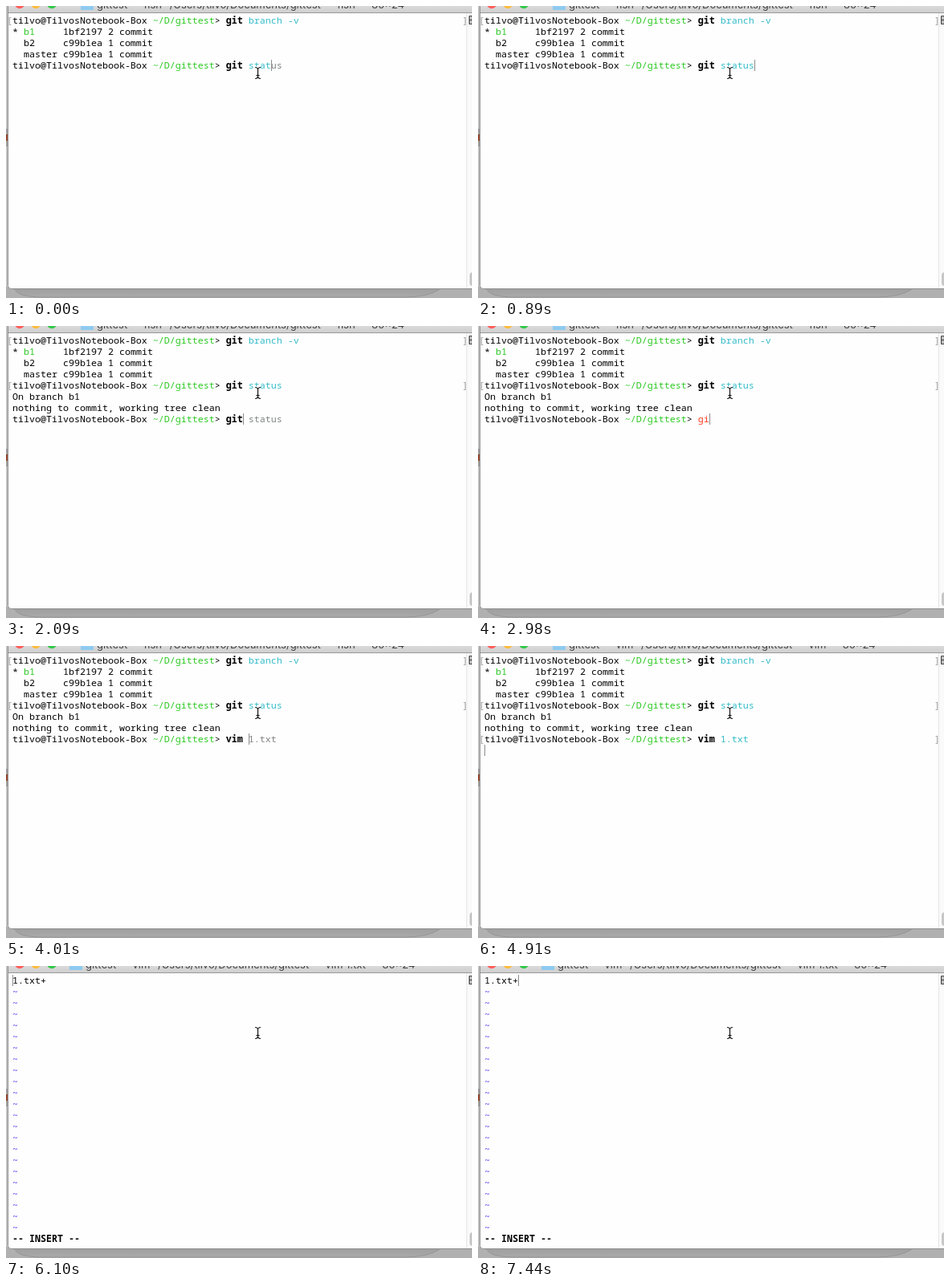
These frames come from a looping animation (580 by 364 pixels, 8000 ms). An HTML page:

```html
<!DOCTYPE html>
<html lang="en">
<head>
<meta charset="utf-8">
<title>Terminal session</title>
<style>
  html, body { margin: 0; width: 100%; height: 100%; overflow: hidden; background: #b0b0b0; }
  svg { display: block; width: 580px; height: 364px; }
  text { white-space: pre; }
  #screen { font: 500 11.667px "Noto Sans Mono", "DejaVu Sans Mono", monospace; fill: #000; }
  #title { font: 13px Inter, sans-serif; fill: #444; }
  .bold { font-weight: bold; }
  .green { fill: #2bc922; }
  .cyan { fill: #33bbc8; }
  .gray { fill: #818383; }
  .red { fill: #fc391f; }
  .blue { fill: #5833ff; }
  .mark { fill: #999; }
</style>
</head>
<body>
<svg viewBox="0 0 580 364">
  <defs>
    <linearGradient id="bar" x2="0" y2="1">
      <stop stop-color="#d9d9d9"/><stop offset="1" stop-color="#d0d0d0"/>
    </linearGradient>
    <linearGradient id="shade" x2="0" y2="1">
      <stop stop-color="#999"/><stop offset="1" stop-color="#a9a9a9"/>
    </linearGradient>
    <path id="beam" d="M310 76.5q3.5 0 3.5 3v8q0 3-3.5 3M317 76.5q-3.5 0-3.5 3M317 90.5q-3.5 0-3.5-3M311.5 86.5h4"/>
  </defs>

  <!-- desktop behind the window -->
  <rect width="4" height="350" fill="#c2c2c2"/>
  <rect y="153" width="3" height="22" fill="#a0a0a0"/>
  <rect y="160" width="3" height="8" fill="#9a4a30"/>
  <path d="M10 346V352Q14 362 40 363H500Q538 361 546 346z" fill="url(#shade)" stroke="#959595"/>

  <!-- window -->
  <path d="M2.5 0V348.500q0 4 4 4H580V0z" fill="#fefefe" stroke="#8e8e8e"/>
  <rect x="3" width="577" height="8" fill="url(#bar)"/>
  <rect x="3" y="8" width="577" height="1" fill="#999"/>
  <rect x="573" y="9" width="7" height="343" fill="#fafafa"/>
  <rect x="573" y="9" width="1" height="343" fill="#e6e6e6"/>
  <path d="M581 12.500h-4.500v10h4.500M577 17.500h3" fill="#bbb" stroke="#444"/>
  <rect x="577" y="332" width="12" height="17" rx="4" fill="#c8c8c8"/>
  <circle cx="17" cy="-2.700" r="6" fill="#fc605c"/>
  <circle cx="37" cy="-2.700" r="6" fill="#fdbc40"/>
  <circle cx="57" cy="-2.700" r="6" fill="#34c84a"/>
  <rect id="folder" y="-8" width="16" height="13" rx="1" fill="#8fcaf0"/>
  <text id="title" y="2.500"></text>

  <g id="screen"></g>

  <!-- mouse pointer -->
  <g fill="none">
    <use href="#beam" stroke="#fff" stroke-width="3"/>
    <use href="#beam" stroke="#111" stroke-width="1.200"/>
  </g>
</svg>
<script>
const LOOP = 8000, CELL = 7, LINE = 14, LEFT = 8, TOP = 11;
const byId = id => document.getElementById(id);

const paint = name => text => `<tspan class="${name}">${text}</tspan>`;
const [bold, green, cyan, gray, red, blue, mark] =
  ["bold", "green", "cyan", "gray", "red", "blue", "mark"].map(paint);

const put = (row, markup, col = 0) =>
  `<text x="${LEFT + CELL * col}" y="${TOP + 11 + LINE * row}">${markup}</text>`;
const caret = (row, col) =>
  `<rect x="${LEFT + CELL * col}" y="${TOP + LINE * row}" width="1" height="${LINE}" fill="#8c8c8c"/>`;
const prompt = (row, input) =>
  put(row, `tilvo@TilvosNotebook-Box ${green("~/D/gittest")}&gt; ${input}`);
const entered = (row, input) =>
  prompt(row, input) + put(row, mark("["), -1) + put(row, mark("]"), 80);

const INPUT = 38;
const branches = entered(0, `${bold("git")} ${cyan("branch -v")}`)
  + put(1, `* ${green("b1")}     1bf2197 2 commit`)
  + put(2, "  b2     c99b1ea 1 commit")
  + put(3, "  master c99b1ea 1 commit");
const status = branches + entered(4, `${bold("git")} ${cyan("status")}`)
  + put(5, "On branch b1")
  + put(6, "nothing to commit, working tree clean");

const first = (typed, input) => branches + prompt(4, input) + caret(4, INPUT + typed);
const second = (typed, input) => status + prompt(7, input) + caret(7, INPUT + typed);

const tildes = Array.from({ length: 22 }, (_, i) => put(i + 1, blue("~"))).join("");
const editor = (col, message) => put(0, "1.txt+") + tildes + put(23, message) + caret(0, col);
const insert = col => editor(col, bold("-- INSERT --"));

const steps = [
  [0, first(8, `${bold("git")} ${cyan("stat")}${gray("us")}`)],
  [890, first(10, `${bold("git")} ${cyan("status")}`)],
  [1190, second(0, "")],
  [1940, second(1, red("g") + gray("it status"))],
  [2090, second(3, bold("git") + gray(" status"))],
  [2380, second(4, bold("git") + gray(" status"))],
  [2680, second(3, bold("git"))],
  [2980, second(2, red("gi"))],
  [3130, second(1, red("g"))],
  [3280, second(0, "")],
  [3570, second(1, red("v") + gray("im 1.txt"))],
  [3720, second(2, bold("vi") + gray("m 1.txt"))],
  [3860, second(3, bold("vim") + gray(" 1.txt"))],
  [4010, second(4, bold("vim") + gray(" 1.txt"))],
  [4610, second(10, `${bold("vim")} ${cyan("1.txt")}`)],
  [4910, status + entered(7, `${bold("vim")} ${cyan("1.txt")}`) + caret(8, 0)],
  [5060, editor(0, '"1.txt" 1L, 7C')],
  [6100, insert(0)],
  [6550, insert(1)],
  [7150, insert(3)],
  [7290, insert(5)],
  [7440, insert(6)]
];

function setTitle(time) {
  const app = time < 4910 ? "fish" : "vim";
  const file = time < 5060 ? "" : " 1.txt";
  const x = file ? 99 : 113;
  byId("title").textContent =
    `gittest — ${app} -/Users/tilvo/Documents/gittest — ${app}${file} — 80×24`;
  byId("title").setAttribute("x", x);
  byId("folder").setAttribute("x", x - 20);
}

const start = performance.now();
let shown;
function frame() {
  const time = (performance.now() - start) % LOOP;
  const step = steps.findLast(([at]) => at <= time);
  if (step !== shown) {
    shown = step;
    byId("screen").innerHTML = step[1];
    setTitle(step[0]);
  }
  requestAnimationFrame(frame);
}
frame();
</script>
</body>
</html>
```
